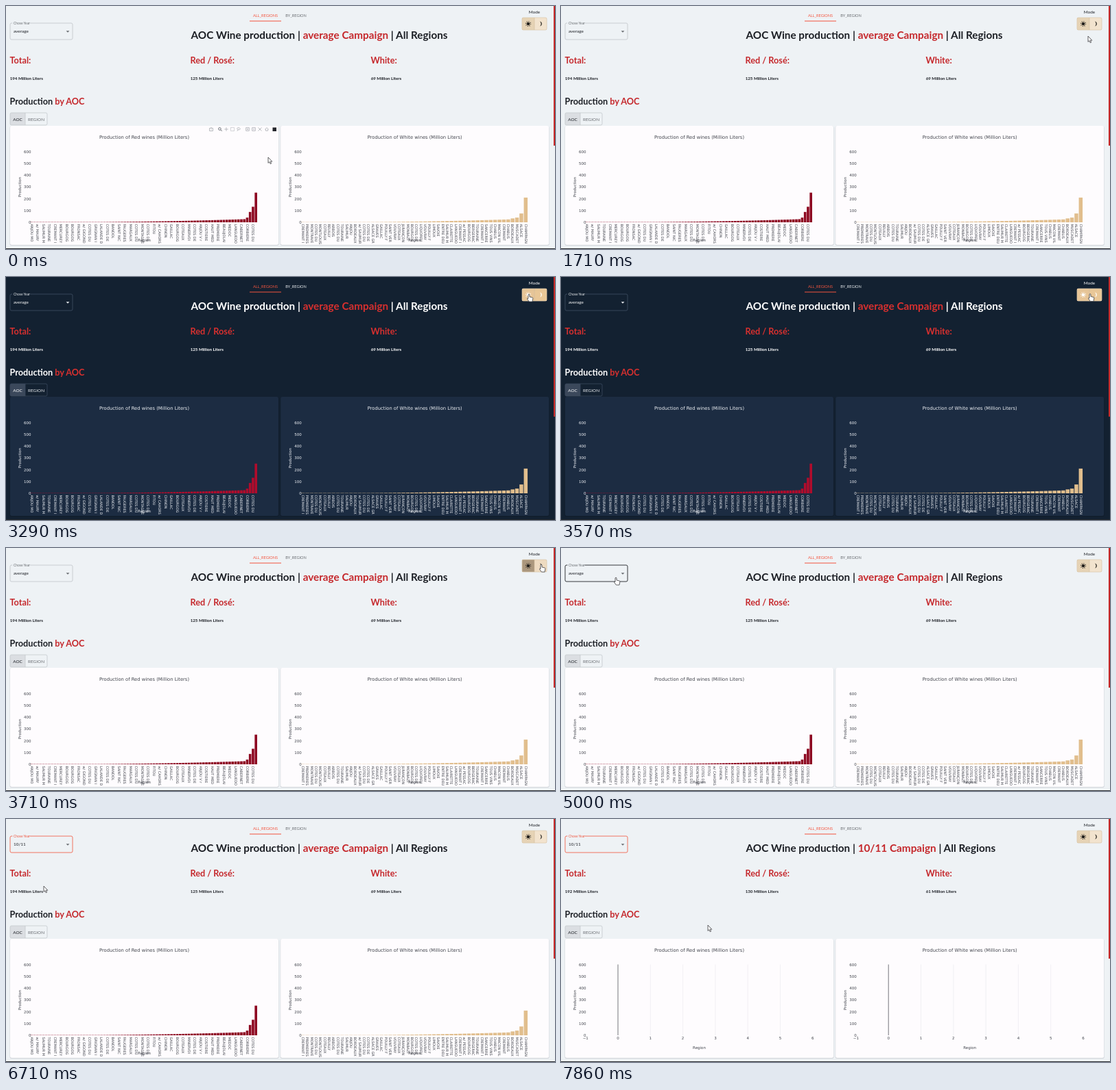
Animation, 800 px wide and 355 px high, one loop 8000 ms. Source, as an HTML page:

```html
<!DOCTYPE html>
<html lang="en">
<head>
<meta charset="utf-8">
<title>Wine production dashboard</title>
<style>
  html, body { margin: 0; width: 100%; height: 100%; overflow: hidden; }
  #stage { display: block; width: 800px; height: 355px; font-family: Lato, "Open Sans", sans-serif;
    --bg: #eef2f5; --card: #fefcfe; --ink: #1c1f25; --red: #c5282c; --mute: #686c71;
    --line: #c5c9cd; --on: #dbdee2; --plot: #42454d; --bar: #8e0a22; --icon: #24211d; --shade: #cfd3d8; }
  #stage.dark { --bg: #132131; --card: #1c2c42; --ink: #fff; --red: #d8302f; --mute: #eceff2;
    --line: #3a4a5f; --on: #3b485b; --plot: #eef1f5; --bar: #b00c2c; --icon: #fff; --shade: #101c2a; }
  text { fill: var(--ink); white-space: pre; }
  .b { font-weight: 700; }
  .r { fill: var(--red); }
  .h { font-size: 12.7px; font-weight: 700; }
  .s { font-size: 6.2px; font-weight: 700; }
  .ui { font-size: 6.4px; }
  .tab { font-size: 5.6px; }
  .mid { text-anchor: middle; }
  .plot text { font-family: "DejaVu Sans", sans-serif; font-size: 5.5px; fill: var(--plot); }
  .plot .title { font-size: 6.75px; }
  .plot .name { font-size: 5px; }
  .end { text-anchor: end; }
  .tools * { fill: none; stroke: #b9bbc0; stroke-width: 1; }
</style>
</head>
<body>
<svg id="stage" viewBox="0 0 800 355">
  <rect width="800" height="355" fill="var(--bg)"/>
  <rect y="354" width="800" height="1" fill="#25282d"/>
  <rect x="798" width="2" height="204" fill="#c62828"/>

  <text class="tab mid" x="378" y="16" style="fill:#f4553f">ALL_REGIONS</text>
  <text class="tab mid" x="422.5" y="16" style="fill:var(--mute)">BY_REGION</text>
  <rect x="355" y="21.5" width="46" height="1" fill="#f4553f"/>

  <text class="ui mid" x="770" y="11.3">Mode</text>
  <rect id="sun" x="752" y="17" width="18" height="18"/>
  <rect id="moon" x="770" y="17" width="18" height="18"/>
  <rect x="752" y="17" width="36" height="18" rx="2" fill="none" stroke="#d9c6a9" stroke-width=".7"/>
  <path d="M770 17v18" stroke="#d0bc9e" stroke-width=".6"/>
  <circle cx="761" cy="26" r="2.3" fill="var(--icon)"/>
  <circle cx="761" cy="26" r="3.5" fill="none" stroke="var(--icon)" stroke-width="1.2" stroke-dasharray="1 1.749"/>
  <path d="M778 22.4A3.7 3.7 0 0 1 778 29.6A5.4 5.4 0 0 0 778 22.4z" fill="var(--icon)"/>

  <rect id="box" x="6" y="25" width="91" height="24" rx="2" fill="none" stroke-width=".9"/>
  <rect x="9.5" y="24" width="25" height="2.2" fill="var(--bg)"/>
  <text id="label" x="11" y="26.9" font-size="4.9">Chose Year</text>
  <text id="year" class="ui" x="11" y="39.4"></text>
  <path d="M87.6 36.2h4.8l-2.4 2.5z" fill="var(--mute)"/>

  <text class="b" x="269.5" y="48.4" font-size="15.3">AOC Wine production | <tspan id="camp" class="r"></tspan> | All Regions</text>

  <text class="h r" x="5.5" y="84.3">Total:</text>
  <text class="h r" x="268.5" y="84.3">Red / Rosé:</text>
  <text class="h r" x="531.5" y="84.3">White:</text>
  <text class="s total" x="5.7" y="108.2"></text>
  <text class="s total" x="268.7" y="108.2"></text>
  <text class="s total" x="531.7" y="108.2"></text>

  <text class="h" x="5.5" y="143.5">Production <tspan class="r">by AOC</tspan></text>
  <path d="M8 156h20v18h-20a2 2 0 0 1 -2 -2v-14a2 2 0 0 1 2 -2z" fill="var(--on)"/>
  <rect x="6" y="156" width="54" height="18" rx="2" fill="none" stroke="var(--line)" stroke-width=".8"/>
  <path d="M28 156v18" stroke="var(--line)" stroke-width=".8"/>
  <text class="ui mid" x="17" y="167.8">AOC</text>
  <text class="ui mid" x="44" y="167.8" style="fill:var(--mute)">REGION</text>

  <g id="plots"></g>
  <g id="menu">
    <rect x="5" y="50" width="93" height="149" rx="2.5" fill="#000" opacity=".12"/>
    <rect x="6" y="49" width="91" height="148" rx="2" fill="#fff"/>
    <rect x="6" y="53" width="91" height="15.5" fill="#fde7e3"/>
    <rect id="hover" x="6" width="91" height="15.5" fill="#000" opacity=".06"/>
  </g>
  <g id="cursor" stroke="#3a3a3e" stroke-width=".8" stroke-linejoin="round" fill="#fff">
    <path id="arrow" d="M0 0V8.4L1.9 6.7L3.2 9.7L4.6 9.1L3.3 6.2H5.8z"/>
    <path id="hand" d="M-1 .8Q0 -.8 1 .8V4L5.2 5Q6 5.2 5.8 6.5L5 11H.4L-2.4 7.2Q-2.6 5.6 -1 6.4z"/>
  </g>
</svg>
<script>
const $ = id => document.getElementById(id);
const stage = $('stage');
const FPS = 7, LOOP = 8000;

function add(parent, tag, attrs, text) {
  const el = document.createElementNS('http://www.w3.org/2000/svg', tag);
  for (const k in attrs) el.setAttribute(k, attrs[k]);
  if (text !== undefined) el.textContent = text;
  parent.appendChild(el);
  return el;
}

const redNames = ('ANJOU MO,w/ MAURY,SAUMUR M,TOURAINE,CREMANT I,MERCUREY,BOURGOG,BOURGOG,FRONSAC,w/ GIGOND,' +
  'COTES DU,GRIGNAN I,LALANDE D,COTES DE,BANDOL,SAINT NIC,FAUGERES,MARGAUX,COTES DU,MONTAGNE,COTES DE,FITOU,' +
  'w/ CAHORS,CHINON,GAILLAC,BOURGOG,COTEAUX,MINERVOI,COTES DE,ANJOU V r,COSTIERE,HAUT MED,PREMIERE,BEAUJOLAI,' +
  'MEDOC,LANGUEDO,CABERNET,CORBIERE,COTES DU').split(',');
const whiteNames = ('CREMANT I,PREMIERES,MONTRAVE,COTES DU,MONTLOUIS,COTEAUX,REUILLY,ARBOIS,COTES DU,TOURAINE,' +
  'SAUMUR,ANJOU,BORDEAUX,w/ SAUMUR,COTES DU,COTES DE,ALSACE GR,GRAVES,GAILLAC,POUILLY F,SAINT VER,VOUVRAY,' +
  'COTEAUX,JURANÇON,MONBAZI,BOURGOG,COTES DE,LIQUOREU,VOUVRAY,POUILLY F,LIMOUX,SAVOIE,ENTRE DEU,SAUMUR M,' +
  'CLAIRETTE,LANGUEDO,CREMANT I,w/ PESSAC,BOURGOG,BERGERAC,TOURAINE,CREMANT I,SANCERRE,TOUS VINS,CHABLIS,' +
  'MACON VIL,CREMANT,CHABLIS,BORDEAUX,MUSCADET,ALSACE,CHAMPAGN').split(',');

// tools appear while the pointer is over a card
function tools(g, x) {
  const t = add(g, 'g', { class: 'tools' });
  const draw = (cx, d) => add(t, 'path', { d, transform: `translate(${x + cx} 180)` });
  draw(299, 'M-2.5 -1.5h5v4h-5zM-1 -2h2M-.6 .5h1.2');
  const zoom = draw(312, 'M1.2 -.5a1.8 1.8 0 1 0 -3.6 0a1.8 1.8 0 1 0 3.6 0M.8 .9L2.7 2.7');
  zoom.style.stroke = '#666a72';
  draw(321, 'M-2.7 0h5.4M0 -2.7v5.4');
  draw(330, 'M-2.5 -2.5h5v5h-5z').style.strokeDasharray = '1.2 .8';
  draw(339, 'M-2 2.6L-1 .8Q-4 -2 0 -2.2Q4 -1 1.4 .6L-1 .8');
  draw(352, 'M-2.3 -2.3h4.6v4.6h-4.6zM-1 0h2M0 -1v2');
  draw(361, 'M-2.3 -2.3h4.6v4.6h-4.6zM-1 0h2');
  draw(370, 'M-2.5 -2.5L2.5 2.5M2.5 -2.5L-2.5 2.5');
  draw(380, 'M-2.7 .2L0 -2.2L2.7 .2M-1.6 0v2.2h3.2v-2.2');
  add(t, 'rect', { x: x + 388.5, y: 177.5, width: 5.5, height: 5.5, style: 'fill:#23252b;stroke:none' });
  return t;
}

// every = number of bars per axis label
function chart(x, kind, names, every, top, fill) {
  const g = add($('plots'), 'g', { class: 'plot' });
  const text = (tx, y, s, cls) => add(g, 'text', { x: x + tx, y, class: cls }, s);
  add(g, 'rect', { x: x + 5.5, y: 175.5, width: 392, height: 174.6, rx: 2.5, fill: 'var(--shade)' });
  add(g, 'rect', { x: x + 6, y: 175, width: 391, height: 174, rx: 2.5, fill: 'var(--card)' });
  text(201.5, 193.6, `Production of ${kind} wines (Million Liters)`, 'title mid');
  for (let v = 0; v <= 6; v++) text(36.6, 318 - v * 17.2, v * 100 || '0', 'end');
  add(g, 'text', { class: 'mid', transform: `translate(${x + 22} 264.5) rotate(-90)` }, 'Production');

  const full = add(g, 'g', {});
  const clip = add(full, 'svg', { x, y: 316, width: 397, height: 33, viewBox: `${x} 316 397 33` });
  const count = names.length * every, step = 331 / count;
  const center = i => x + 35.3 + (i + .5) * step;
  names.forEach((s, i) => add(clip, 'text',
    { class: 'name', transform: `translate(${center(i * every) - 1.8} 318.4) rotate(90)` }, s));
  add(clip, 'text', { x: x + 201.5, y: 344.4, class: 'mid' }, 'Region');
  for (let i = 0; i < count; i++) {
    const rank = count - 1 - i;
    const v = rank < top.length ? top[rank] : Math.max(2, 31 * (i / count) ** 2.3);
    const h = v * .172, w = step * .86;
    add(full, 'rect', { x: center(i) - w / 2, y: 316 - h, width: w, height: h, fill });
  }

  const empty = add(g, 'g', {});
  for (let i = -1; i <= 6; i++) {
    const cx = x + 83 + i * 47.3;
    add(empty, 'text', { x: cx, y: 321.5, class: 'mid' }, String(i).replace('-', '−'));
    if (i >= 0 && i < 6) add(empty, 'path', { d: `M${cx} 212.5V316`,
      stroke: i ? '#eeedf1' : '#74767c', 'stroke-width': i ? .8 : 1 });
  }
  add(empty, 'text', { x: x + 201.5, y: 336, class: 'mid' }, 'Region');
  return { x, full, empty, tools: tools(g, x) };
}

const charts = [
  chart(0, 'Red', redNames, 2, [252, 132, 88, 40], 'var(--bar)'),
  chart(394.2, 'White', whiteNames, 1, [210, 75, 40, 33], '#e1be8d'),
];

const years = ['average', '09/10', '10/11', '11/12', '12/13', '13/14', '14/15', '15/16', '16/17'];
years.forEach((s, i) => add($('menu'), 'text', { class: 'ui', x: 13, y: 63 + i * 15.5, style: 'fill:#1c1f25' }, s));

// pointer stops: [step, x, y]
const stops = [[0, 382, 221], [4, 382, 221], [12, 768, 44], [15, 764, 30], [17, 764, 30], [22, 762, 25],
  [24, 762, 25], [26, 780, 24], [29, 780, 24], [35, 80, 43], [37, 80, 43], [40, 72, 130], [42, 72, 130],
  [45, 56, 98], [47, 55, 98], [49, 55, 98], [53, 214, 155], [56, 214, 155]];

function pointer(n) {
  const i = stops.findIndex(s => s[0] > n);
  const [a, ax, ay] = stops[i - 1], [b, bx, by] = stops[i];
  const k = (n - a) / (b - a);
  return [ax + (bx - ax) * k, ay + (by - ay) * k];
}

const toggles = [[0, '#e6d3b5', '#f2e3ce'], [22, '#d5ba91', '#c2a981'], [23, '#e7c597', '#e9c797'],
  [26, '#ab977d', '#eedbc1'], [27, '#e6d3b5', '#f2e3ce']];
const show = (el, on) => { el.style.display = on ? '' : 'none'; };
let last = -1;

function render(n) {
  const between = (a, b) => n >= a && n < b;
  stage.classList.toggle('dark', between(23, 26));

  const [, sun, moon] = toggles.filter(s => s[0] <= n).pop();
  $('sun').setAttribute('fill', sun);
  $('moon').setAttribute('fill', moon);

  const focus = n >= 38, picked = n >= 45, loaded = n >= 51;
  $('box').setAttribute('stroke', focus ? '#f0654f' : between(34, 38) ? '#202328' : 'var(--line)');
  $('label').style.fill = focus ? '#f0553f' : 'var(--mute)';
  $('year').textContent = picked ? '10/11' : 'average';
  $('camp').textContent = (loaded ? '10/11' : 'average') + ' Campaign';
  const totals = loaded ? [192, 130, 61] : [194, 125, 69];
  stage.querySelectorAll('.total').forEach((el, i) => { el.textContent = totals[i] + ' Million Liters'; });

  const [x, y] = pointer(n);
  const hand = between(13, 30) || between(34, 46);
  $('cursor').setAttribute('transform', `translate(${x} ${y})`);
  show($('hand'), hand);
  show($('arrow'), !hand);
  for (const c of charts) {
    show(c.full, !loaded);
    show(c.empty, loaded);
    show(c.tools, y > 175 && x > c.x + 6 && x < c.x + 397);
  }

  show($('menu'), between(37, 45));
  const row = Math.floor((y - 53) / 15.5);
  show($('hover'), row >= 0);
  $('hover').setAttribute('y', 53 + row * 15.5);
}

function tick() {
  const t = performance.now() % LOOP;
  const n = Math.min(55, Math.floor(t * FPS / 1000 + .05));
  if (n !== last) render(last = n);
  requestAnimationFrame(tick);
}
tick();
</script>
</body>
</html>
```
